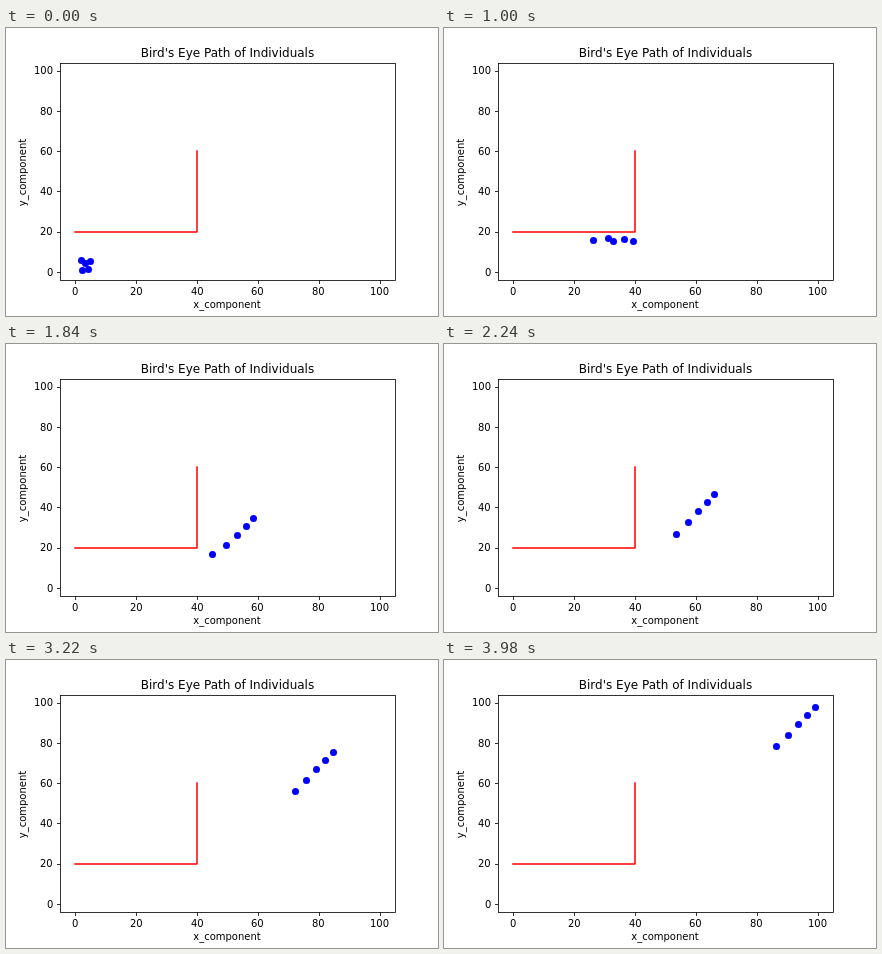
Animation of 432x288 px, one loop 4000 ms. Source, as an HTML page:

```html
<!DOCTYPE html>
<html lang="en">
<head>
<meta charset="utf-8">
<title>Bird's Eye Path</title>
<style>
  html, body { margin: 0; width: 100%; height: 100%; overflow: hidden; background: #fff; }
  svg { display: block; width: 432px; height: 288px; }
  text { font: 10px "DejaVu Sans", sans-serif; fill: #000; }
  .title { font-size: 12px; }
  .mid { text-anchor: middle; }
  .axis { fill: none; stroke: #000; stroke-width: .8; }
  .wall { fill: none; stroke: #f00; stroke-width: 1.5; stroke-linecap: square; stroke-linejoin: round; }
  .dot { fill: #00f; }
</style>
</head>
<body>
<svg viewBox="0 0 432 288">
  <rect class="axis" x="54.5" y="35.5" width="335" height="217"/>
  <text class="title mid" x="221.5" y="29">Bird's Eye Path of Individuals</text>
  <text class="mid" x="221" y="280">x_component</text>
  <text class="mid" transform="translate(20 144.5) rotate(-90)">y_component</text>
  <g id="ticks"></g>
  <path class="wall" d="M69 204H191V123"/>
  <g id="dots"></g>
</svg>
<script>
const LOOP = 4000, STEP = 20, DIGIT = 6.36;

function add(parent, tag, attrs, text = '') {
  const el = document.createElementNS('http://www.w3.org/2000/svg', tag);
  for (const key in attrs) el.setAttribute(key, attrs[key]);
  el.textContent = text;
  document.getElementById(parent).append(el);
  return el;
}

const centre = v => Math.floor(v) + 0.5;

for (let v = 0; v <= 100; v += 20) {
  const x = 69.22 + v * 3.0436, y = 243.95 - v * 2.0133;
  const width = DIGIT * String(v).length;
  add('ticks', 'path', { class: 'axis', d: `M${centre(x + 0.5)} 252.5v3.5M54.5 ${centre(y + 0.5)}h-3.5` });
  add('ticks', 'text', { x: Math.round(x - width / 2), y: 267 }, v);
  add('ticks', 'text', { x: Math.round(47 - width), y: Math.round(y + 3.8) }, v);
}

// Leader first: where each one starts, and where it meets the wall.
const people = [
  { start: [82, 241], wall: [142, 219] },
  { start: [84, 233], wall: [142, 211] },
  { start: [76, 242], wall: [133, 215] },
  { start: [79, 235], wall: [135, 209] },
  { start: [75, 232], wall: [119, 212] }
];

// All turn the corner on one track, with growing gaps, then head straight for the goal.
const turnTime = i => 1138 + 124 * i + 10.5 * i * i;
const track = [
  [0, 203.5, 212],
  [165, 216.5, 205.5],
  [300, 224.8, 198.3],
  [2900, 374.5, 44]
];

const routes = people.map(({ start, wall }, i) => [
  [0, ...start],
  [540, ...wall],
  ...track.map(([t, x, y]) => [turnTime(i) + t, x, y])
]);
const dots = people.map(() => add('dots', 'circle', { class: 'dot', r: 3.5 }));

function place(stops, t) {
  const i = Math.max(1, stops.findIndex(s => s[0] >= t));
  const [t0, x0, y0] = stops[i - 1], [t1, x1, y1] = stops[i];
  const k = (t - t0) / (t1 - t0);
  return [x0 + (x1 - x0) * k, y0 + (y1 - y0) * k];
}

function draw(now) {
  const t = Math.floor((now % LOOP) / STEP) * STEP;
  dots.forEach((dot, i) => {
    const [x, y] = place(routes[i], t);
    dot.setAttribute('cx', centre(x));
    dot.setAttribute('cy', centre(y));
  });
}

let start;
function tick(now) {
  start ??= now;
  draw(now - start);
  requestAnimationFrame(tick);
}
draw(0);
requestAnimationFrame(tick);
</script>
</body>
</html>
```
